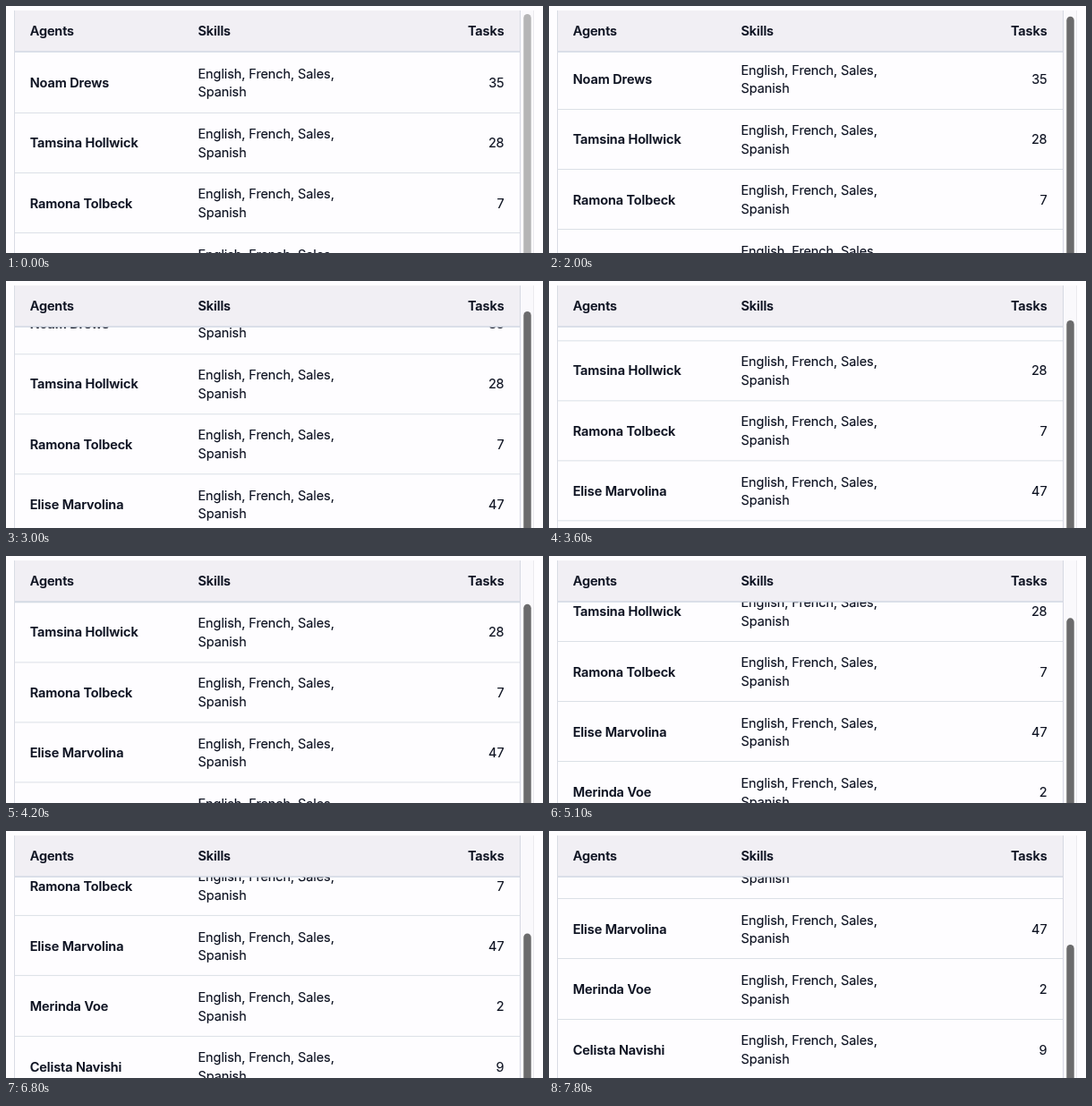
Animation of 600 by 276 pixels, one loop 8 s. Source, as an HTML page:

```html
<!DOCTYPE html>
<html lang="en">
<head>
<meta charset="utf-8">
<title>Agents table</title>
<style>
@property --scroll { syntax: "<length>"; inherits: true; initial-value: 0px; }

html, body { margin: 0; width: 100%; height: 100%; overflow: hidden; }
body { background: #fefdff; }

.stage {
  position: relative;
  width: 600px;
  height: 276px;
  overflow: hidden;
  font: 400 14.49px/20.7px Inter, Roboto, sans-serif;
  letter-spacing: -0.006em;
  color: #0c1120;
  -webkit-text-stroke: .12px;
  animation: scroll 8s -1ms linear infinite;
}
.stage * { box-sizing: border-box; }

.table {
  position: absolute;
  left: 9px; top: 5px;
  width: 566px; height: 280px;
  overflow: hidden;
  border-left: 1px solid #d9dce4;
  border-right: 1px solid #d6d8e2;
}
.head {
  position: absolute;
  inset: 0 0 auto;
  z-index: 1;
  height: 46px;
  background: #f1eff4;
  border-bottom: 1px solid #dcdfe8;
  box-shadow: 0 1px 0 rgba(205, 212, 224, .75);
}
.rows {
  position: absolute;
  left: 0; right: 0; top: 47.4px;
  transform: translateY(calc(var(--scroll) * -1));
}
.row { position: relative; height: 67.27px; border-bottom: 1px solid #dbe0e6; }

.name, .skills, .tasks { position: absolute; white-space: nowrap; }
.name { left: 16.7px; top: 23.8px; }
.skills { left: 204.5px; top: 13.4px; }
.tasks { right: 17.5px; top: 23.8px; }
.head > span { top: 12.6px; }
.name, .head { font-weight: 600; }

.track {
  position: absolute;
  left: 575px; top: 5px;
  width: 15px; height: 271px;
  background: #faf9fc;
  border-right: 1px solid #ebeaef;
}
.thumb {
  position: absolute;
  left: 578px; top: 9px;
  width: 9px; height: 420px;
  border-radius: 4.5px;
  transform: translateY(calc(var(--scroll) * .663)) scaleX(.94);
  animation: press 8s -1ms step-end infinite;
}

@keyframes press {
  0% { background: #b5b5b6; }
  18.75%, 100% { background: #6b6b6c; }
}
/* 1.25% is one 100 ms tick */
@keyframes scroll {
  0% { --scroll: 0px; }
  20% { --scroll: 0px; animation-timing-function: steps(4); }
  25% { --scroll: 4px; animation-timing-function: steps(5); }
  31.25% { --scroll: 19.5px; animation-timing-function: steps(5); }
  37.5% { --scroll: 37.7px; animation-timing-function: steps(12); }
  52.5% { --scroll: 67.6px; animation-timing-function: steps(9); }
  63.75% { --scroll: 91px; animation-timing-function: steps(10); }
  76.25% { --scroll: 129.7px; animation-timing-function: steps(9); }
  87.5% { --scroll: 167.5px; animation-timing-function: steps(3); }
  91.25% { --scroll: 176px; }
  95% { --scroll: 176px; animation-timing-function: steps(2); }
  97.5%, 100% { --scroll: 178px; }
}
</style>
</head>
<body>
<div class="stage">
  <div class="table">
    <div class="head">
      <span class="name">Agents</span>
      <span class="skills">Skills</span>
      <span class="tasks">Tasks</span>
    </div>
    <div class="rows"></div>
  </div>
  <div class="track"></div>
  <div class="thumb"></div>
</div>
<script>
const agents = [
  ["Noam Drews", 35],
  ["Tamsina Hollwick", 28],
  ["Ramona Tolbeck", 7],
  ["Elise Marvolina", 47],
  ["Merinda Voe", 2],
  ["Celista Navishi", 9]
];

document.querySelector(".rows").innerHTML = agents.map(([name, tasks]) => `
  <div class="row">
    <span class="name">${name}</span>
    <span class="skills">English, French, Sales,<br>Spanish</span>
    <span class="tasks">${tasks}</span>
  </div>`).join("");
</script>
</body>
</html>
```
